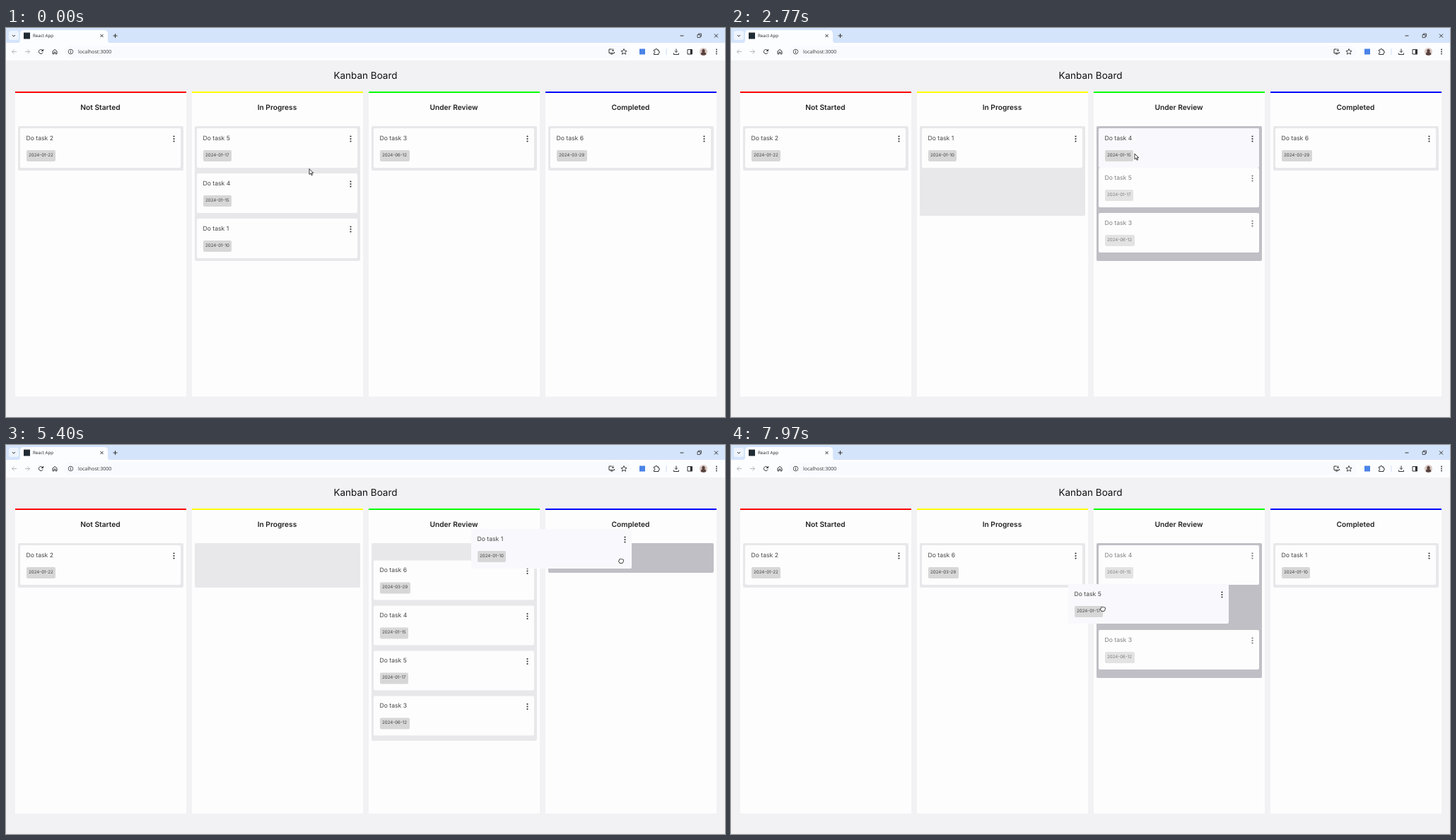
These frames come from a looping animation (1017x551 px, 8 s). An HTML page:

```html
<!DOCTYPE html>
<html lang="en">
<head>
<meta charset="utf-8">
<title>Kanban Board</title>
<style>
html, body { margin: 0; width: 100%; height: 100%; overflow: hidden; }
body { background: #f2f2f4; font-family: Poppins, Inter, sans-serif; text-rendering: geometricPrecision; }
#stage { position: relative; width: 1017px; height: 551px; overflow: hidden; background: #f2f2f4; }
#stage > * { position: absolute; }
#browser, #pointer { left: 0; top: 0; }
#browser text { font-family: "Open Sans", sans-serif; }
h1, h2 { margin: 0; text-align: center; white-space: nowrap; }
h1 { left: 0; width: 1017px; top: 58px; font: 400 13.5px/20px Poppins, Inter, sans-serif; color: #111; }
h2 { font: 600 10.2px/16px Poppins, Inter, sans-serif; color: #222; padding-top: 13px; }
.column { top: 90px; width: 242px; height: 431.5px; box-sizing: border-box; border-top: 2px solid; background: #fdfdfe; }
.zone { top: 139px; width: 234px; border-radius: 2px; background: #e8e8ea; }
.zone.over { background: #bfbfc5; }
.card { left: 0; top: 0; width: 227px; height: 56px; border-radius: 2px; background: #fdfdfe; color: #444; }
.card.faded > * { opacity: .68; }
.card.held { background: #f9f9fd; z-index: 1; }
.card > * { position: absolute; }
.name { left: 8.5px; top: 9px; font-size: 8.65px; line-height: 12px; white-space: nowrap; }
.date { left: 8.5px; top: 31px; padding: 0 3.5px; font-size: 6.2px; line-height: 16px; border-radius: 2px; background: #d7d7d8; color: #444; white-space: nowrap; }
.menu { left: 215.5px; top: 9.5px; width: 3px; height: 10px; }
#pointer { z-index: 2; pointer-events: none; }
</style>
</head>
<body>
<div id="stage">
  <svg id="browser" width="1017" height="46" fill="none" stroke="#333" stroke-width="1">
    <g stroke="none">
      <path fill="#d4e4fb" d="M0 0h1017v22H0z"/>
      <path fill="#fcfdff" d="M0 21h1017v25H0z"/>
      <path fill="#eef4fe" d="M7 4h8a3 3 0 0 1 3 3v7a3 3 0 0 1-3 3H7a3 3 0 0 1-3-3V7a3 3 0 0 1 3-3z"/>
      <path fill="#fcfdff" d="M15 22q5 0 5-5V8q0-5 5-5h114q5 0 5 5v9q0 5 5 5z"/>
      <rect x="82" y="25" width="802" height="17" rx="8.5" fill="#f8fafe"/>
      <rect x="25" y="6.500" width="9" height="9" fill="#202a32"/>
      <rect x="896" y="29.500" width="8" height="8" fill="#4a83e8"/>
      <circle cx="986.500" cy="33.500" r="5.500" fill="#dbc9c3"/>
      <path fill="#58423f" d="M982.600 37.400q.4-3 2.400-3.400a2.300 2.300 0 1 1 3 0q2 .4 2.400 3.400-3.900 2.600-7.800 0z"/>
      <text x="38" y="13.300" font-size="6.200" fill="#222">React App</text>
      <text x="102" y="36" font-size="7" fill="#333">localhost:3000</text>
      <g fill="#333">
        <circle cx="1005" cy="30.500" r=".9"/><circle cx="1005" cy="33.500" r=".9"/><circle cx="1005" cy="36.500" r=".9"/>
      </g>
    </g>
    <path d="M9 10l2 2 2-2M133.500 9l4 4m0-4l-4 4M154.500 8v6m-3-3h6M953.500 11h5M1002 8.500l5 5m0-5l-5 5"/>
    <path d="M978 9.500h4v4h-4zM979.500 9.500v-1.500h4v4h-1.500" stroke-width=".8"/>
    <path d="M15 33.500H8.500m3-3l-3 3 3 3M27 33.500h6.500m-3-3l3 3-3 3" stroke="#b6b8bc"/>
    <path d="M52 32a3 3 0 1 0 .2 2.500M52.500 30v2.500H50M66 33v3.800h2v-2.600h2v2.600h2V33l-3-2.600z"/>
    <circle cx="91.500" cy="33.500" r="3.300" stroke-width=".8"/>
    <path d="M91.500 33v2.300m0-4.100v.9"/>
    <path d="M857 30h-4v5.500h7.500V34m-5.500 3h3.500m0-7.500v3.500m-1.500-1.500l1.500 1.500 1.500-1.500"/>
    <path d="M874 29.500l1.200 2.700 2.900.3-2.200 1.900.7 2.800-2.600-1.500-2.600 1.500.7-2.800-2.200-1.900 2.900-.3z" stroke-width=".9"/>
    <path d="M916.500 31h2q0-1.700 1.300-1.700T921 31h2v2q1.500 0 1.500 1.200T923 35.500V37.500h-6.500v-2q1.400-.2 1.400-1.300t-1.400-1.200z"/>
    <path d="M934 29v9" stroke="#cfe0fa"/>
    <path d="M948 29.500v5m-2-2l2 2 2-2M944.500 35.500v2h7v-2M964 30.500h6.500v6.500H964z"/>
    <path d="M969 30.500v6.500" stroke-width="2.500"/>
  </svg>
  <h1>Kanban Board</h1>
  <svg id="pointer" width="20" height="20" viewBox="-10 -10 20 20" fill="#fff" stroke="#222" stroke-width=".9" stroke-linejoin="round">
    <path id="arrow" d="M-2-4.500v8l1.900-1.700 1.300 2.900 1.300-.6-1.300-2.800h2.500z"/>
    <path id="open" d="M-2.200 4.200L-4.500.8q-.3-1.300 1-.8l.9.900-.7-3.500q.9-1.300 1.600.2l.3-1.200q.9-1.100 1.500.1l1.400.2.200.9q1.500-.5 1.600.8L3 1.800 2 4.200z"/>
    <path id="closed" d="M-2 3.400L-3.400.8q-.3-1.100.7-1l.1-1.700q.8-.9 1.600-.3.900-.9 1.700 0 1-.6 1.600.3 1.200-.2 1.200 1L3 1.600 2 3.400z"/>
  </svg>
</div>
<script>
const LOOP = 8000, PITCH = 250, TOP = 142, STEP = 64, CARD = 56;
const stage = document.getElementById('stage');
const pointer = document.getElementById('pointer');

const columns = [['Not Started', 'red'], ['In Progress', 'yellow'], ['Under Review', 'lime'], ['Completed', 'blue']];
const dates = { 1: '01-10', 2: '01-22', 3: '06-12', 4: '01-15', 5: '01-17', 6: '03-29' };
const startLists = [[2], [5, 4, 1], [3], [6]];

// over: when the held card enters which column
const moves = [
  { id: 5, from: 1, to: 2, start: 220, drop: 640, settle: 1040, over: [[220, 1], [540, 2]] },
  { id: 4, from: 1, to: 2, start: 1800, drop: 2400, settle: 2830, over: [[1800, 1], [2240, 2]] },
  { id: 6, from: 3, to: 2, start: 3450, drop: 4250, settle: 4650, over: [[3450, 3], [3957, 2]] },
  { id: 1, from: 1, to: 3, start: 4850, drop: 5520, settle: 5930, over: [[4850, 1], [5050, 2], [5350, 3]] },
  { id: 6, from: 2, to: 1, start: 6400, drop: 7100, settle: 7450, over: [[6400, 2], [7005, 1]] },
  { id: 5, from: 2, to: 2, start: 7700, drop: 9000, settle: 9400, over: [[7700, 2]] }
];

// time, x, y
const path = [
  [0, 431, 204], [220, 434, 180], [580, 573, 181], [660, 575, 181], [930, 832, 179.5],
  [1200, 832, 179.5], [1700, 434, 181], [1800, 434, 181], [2300, 573, 182.5], [2850, 573, 182.5],
  [3350, 830, 181], [3450, 830, 181], [3957, 697, 186], [4100, 683, 187], [4280, 678, 187],
  [4780, 482, 187], [4850, 482, 187], [5350, 866, 165], [5400, 870, 164], [5540, 874, 164],
  [6300, 588, 176], [6400, 588, 176], [7005, 455, 159], [7120, 448, 160],
  [7600, 569, 241], [7700, 569, 241], [7970, 526, 232], [8000, 523, 231]
];

const clamp = v => Math.max(0, Math.min(1, v));
const mix = (a, b, p) => a + (b - a) * p;
const smooth = p => p * p * (3 - 2 * p);
const easeOut = p => 1 - (1 - p) ** 5;

// cubic-bezier(.2, 0, 0, 1)
function glide(p) {
  let lo = 0, hi = 1;
  for (let i = 0; i < 20; i++) {
    const u = (lo + hi) / 2;
    if (.6 * u * (1 - u) ** 2 + u ** 3 < p) lo = u; else hi = u;
  }
  return p >= 1 ? 1 : 3 * (1 - lo) * lo * lo + lo ** 3;
}

function cursorAt(t) {
  let i = 0;
  while (i < path.length - 2 && path[i + 1][0] <= t) i++;
  const [t0, x0, y0] = path[i], [t1, x1, y1] = path[i + 1];
  const p = smooth(clamp((t - t0) / (t1 - t0)));
  return [mix(x0, x1, p), mix(y0, y1, p)];
}

function add(cls, html, left) {
  const el = document.createElement('div');
  el.className = cls;
  el.innerHTML = html;
  if (left !== undefined) el.style.left = left + 'px';
  stage.insertBefore(el, pointer);
  return el;
}

columns.forEach(([name, color], i) => {
  add('column', `<h2>${name}</h2>`, 12.5 + PITCH * i).style.borderColor = color;
});
const zones = columns.map((_, i) => add('zone', '', 16.5 + PITCH * i));
const dots = [1.5, 5, 8.5].map(y => `<circle cx="1.5" cy="${y}" r="1.1"/>`).join('');
const cards = {};
for (const id in dates) {
  cards[id] = add('card', `<span class="name">Do task ${id}</span><span class="date">2024-${dates[id]}</span>
    <svg class="menu" fill="#333">${dots}</svg>`);
}

const slot = (col, k) => [20 + PITCH * col, TOP + STEP * k];
const zoneHeight = n => n ? STEP * n - 1 : 7;

// how far a column has opened its gap for the held card
function gap(move, col, t) {
  let value = 0;
  move.over.forEach(([at, c], i) => {
    if (t < at) return;
    const p = glide(clamp((t - at) / 200));
    if (c === col) value = i ? p : 1;
    else if (i && move.over[i - 1][1] === col) value = 1 - p;
  });
  return value;
}

function heldPosition(move, index, t) {
  const home = slot(move.from, index), grab = cursorAt(move.start);
  const now = cursorAt(Math.min(t, move.drop));
  const p = easeOut(clamp((t - move.drop) / (move.settle - move.drop)));
  return slot(move.to, 0).map((goal, i) => mix(home[i] + now[i] - grab[i], goal, p));
}

function render(t) {
  const lists = startLists.map(l => [...l]);
  let closing = null;
  for (const m of moves) {
    if (t < m.settle) break;
    lists[m.from].splice(lists[m.from].indexOf(m.id), 1);
    lists[m.to].unshift(m.id);
    closing = m;
  }
  const move = moves.find(m => t >= m.start && t < m.settle);
  const [cx, cy] = cursorAt(t);
  const overCol = move ? move.over.filter(o => t >= o[0]).pop()[1] : -1;
  let hover = false;

  lists.forEach((list, col) => {
    const home = move && move.from === col;
    const index = home ? list.indexOf(move.id) : 0;
    const open = move ? gap(move, col, t) : 0;
    const rest = list.filter(id => !move || id !== move.id);
    let height = zoneHeight(list.length);
    if (move && !home) height = mix(height, zoneHeight(list.length + 1), open);
    if (closing && closing.from === col) {
      height = mix(zoneHeight(list.length + 1), height, glide(clamp((t - closing.settle) / 200)));
    }
    zones[col].style.height = height + 'px';
    zones[col].classList.toggle('over', col === overCol);

    rest.forEach((id, k) => {
      const [x, y0] = slot(col, k);
      const y = y0 + (k >= index ? CARD * open : 0);
      cards[id].style.transform = `translate(${x}px, ${y}px)`;
      cards[id].className = col === overCol ? 'card faded' : 'card';
      if (cx > x && cx < x + 227 && cy > y && cy < y + CARD) hover = true;
    });
    if (home) {
      const [x, y] = heldPosition(move, index, t);
      cards[move.id].style.transform = `translate(${x}px, ${y}px)`;
      cards[move.id].className = 'card held';
    }
  });

  const shape = move && t < move.drop ? 'closed' : hover ? 'open' : 'arrow';
  for (const el of pointer.children) el.style.display = el.id === shape ? '' : 'none';
  pointer.style.transform = `translate(${cx - 10}px, ${cy - 10}px)`;
}

const begin = performance.now();
function tick() {
  render((performance.now() - begin) % LOOP);
  requestAnimationFrame(tick);
}
tick();
</script>
</body>
</html>
```
